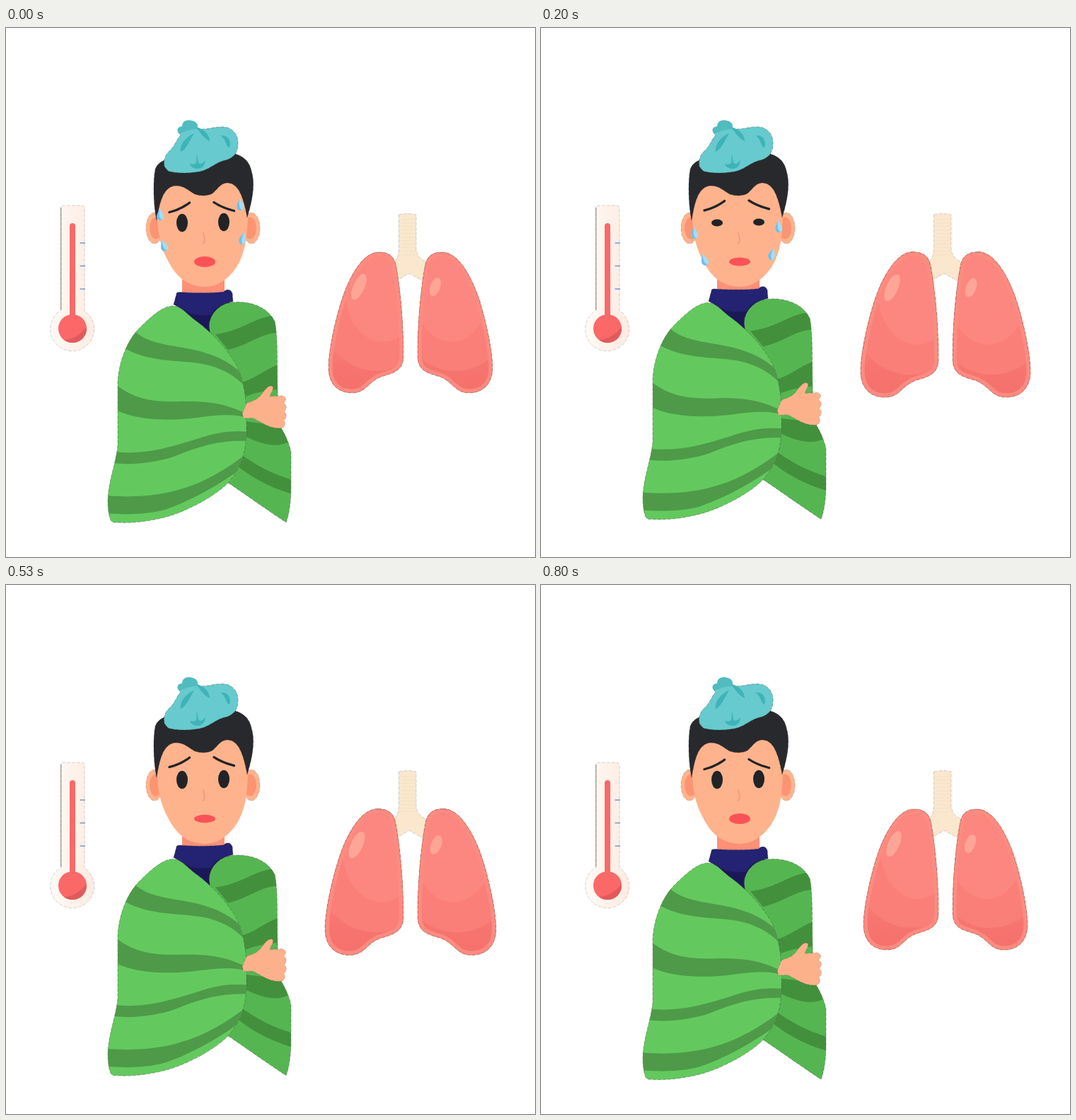
An HTML page that plays this animation: 748x748 px, repeating every 0.94 s.

```html
<!DOCTYPE html>
<html lang="en">
<head>
<meta charset="utf-8">
<title>Fever and lungs</title>
<style>
html, body { margin: 0; width: 100%; height: 100%; overflow: hidden; background: #fff; }
svg { display: block; width: 100vw; height: 100vh; }
.edge { stroke: #3a3433; stroke-width: .6; stroke-opacity: .6; stroke-dasharray: 5 2; }
.faint { stroke-opacity: .35; }
.line { fill: none; stroke-linecap: round; }
</style>
</head>
<body>
<svg viewBox="0 0 748 748" xmlns="http://www.w3.org/2000/svg">
  <defs>
    <linearGradient id="glass"><stop offset="0" stop-color="#fffaf6"/><stop offset="1" stop-color="#fdebe0"/></linearGradient>
    <linearGradient id="flesh" x1="0" y1="0" x2="0" y2="1"><stop offset=".5" stop-color="#f97d76"/><stop offset="1" stop-color="#f5706b"/></linearGradient>
    <path id="lobe" d="M528 317C508 316 490 343 478 375C467 405 456 455 456 480C456 504 470 516 489 516C511 516 512 498 534 492C552 487 562 482 562 463C562 420 558 370 551 334C548 322 540 317 528 317Z"/>
    <path id="front" d="M236 393C222 393 205 408 190 423C172 440 160 470 158 500L158 590C156 615 143 645 144 672C145 690 147 698 152 699C180 701 212 697 240 687C270 676 300 658 314 643C328 628 340 605 340 570C341 530 338 500 325 475C310 450 290 430 270 415C256 405 248 393 236 393Z"/>
    <path id="back" d="M288 428C284 410 298 391 318 388C345 385 370 394 380 415C385 440 383 480 384 510L385 560C392 568 402 590 403 600L403 650C403 670 400 690 396 699C370 682 335 657 314 643L300 560Z"/>
    <clipPath id="lobeClip"><use href="#lobe"/></clipPath>
    <clipPath id="lobeClipR"><use href="#lobe" transform="matrix(-1 0 0 1 1144 0)"/></clipPath>
    <clipPath id="frontClip"><use href="#front"/></clipPath>
    <clipPath id="backClip"><use href="#back"/></clipPath>
    <clipPath id="bulb"><circle cx="94" cy="425" r="20"/></clipPath>
    <g id="drop">
      <path fill="#a6dcf4" d="M0-9C2-3 5 0 5 4A5 5 0 0 1-5 4C-5 0-2-3 0-9Z"/>
      <path fill="#72bde6" d="M0-9C-2-3-5 0-5 4A5 5 0 0 0 2 8.500C-2 6-2 0 0-9Z"/>
    </g>
  </defs>

  <!-- thermometer -->
  <path class="edge faint" fill="url(#glass)" d="M78 399V255Q78 251 83 251H106Q111 251 111 255V400A31 31 0 1 1 78 399Z"/>
  <path class="line" stroke="#6d6260" stroke-width=".8" d="M77.700 254V398"/>
  <path class="line" stroke="#fb6868" stroke-width="8" d="M94 280V412"/>
  <circle cx="94" cy="425" r="20" fill="#fb6868"/>
  <path clip-path="url(#bulb)" fill="#e15a5b" d="M80 441C98 441 107 430 115 422V447H80Z"/>
  <path stroke="#6a9fd0" stroke-width="1.600" d="M104.500 304H112M104.500 336.500H112M104.500 369H112"/>

  <!-- windpipe and lungs -->
  <path class="edge faint" fill="#fae7ce" d="M555.500 264Q568 261 580 264V313C581 323 588 329 597 332L590 358L570 347L551 358L546 331C553 329 555 322 555.500 313Z"/>
  <path id="rings" stroke="#f6e0c4" stroke-width="1.200" fill="none"/>
  <g id="lungL">
    <use href="#lobe" fill="url(#flesh)"/>
    <g clip-path="url(#lobeClip)">
      <ellipse cx="525" cy="390" rx="85" ry="95" fill="#fa7f78"/>
      <ellipse cx="533" cy="370" rx="54" ry="74" fill="#fc8780"/>
      <use href="#lobe" fill="none" stroke="#fc8b80" stroke-width="11"/>
    </g>
    <use href="#lobe" class="edge" fill="none"/>
    <ellipse fill="#fea597" rx="8" ry="19.500" transform="translate(499 366) rotate(24)"/>
  </g>
  <g id="lungR">
    <use href="#lobe" fill="url(#flesh)" transform="matrix(-1 0 0 1 1144 0)"/>
    <g clip-path="url(#lobeClipR)">
      <ellipse cx="635" cy="390" rx="84" ry="95" fill="#fa7f78"/>
      <ellipse cx="630" cy="370" rx="54" ry="74" fill="#fc8780"/>
      <use href="#lobe" fill="none" stroke="#fc8b80" stroke-width="11" transform="matrix(-1 0 0 1 1144 0)"/>
    </g>
    <use href="#lobe" class="edge" fill="none" transform="matrix(-1 0 0 1 1144 0)"/>
    <ellipse fill="#fea597" rx="7" ry="13.500" transform="translate(607 366) rotate(20)"/>
  </g>

  <!-- neck and body -->
  <path fill="#fd9076" d="M249 335H309V385H249Z"/>
  <g id="body">
    <path fill="#1b1859" d="M240 388H318L290 434L262 425Z"/>
    <path class="edge" fill="#242273" d="M237 391L241 376Q241 373 246 373.500C268 375 292 375 308 373C312 368 318 370 320 375L321 387C302 390 294 397 290 405Q274 407 262 404Z"/>
    <use href="#back" class="edge" fill="#55b651"/>
    <g clip-path="url(#backClip)" fill="#43903c">
      <path d="M296 433C335 428 350 409 382 406L386 431C360 431 345 448 314 455Z"/>
      <path d="M330 502C350 498 368 481 388 475V511C365 512 348 517 334 523Z"/>
      <path d="M336 556L388 562L402 584C385 595 360 589 336 576Z"/>
      <path d="M330 601C355 620 380 632 408 640V660C375 651 345 635 324 616Z"/>
    </g>
    <use href="#front" class="edge" fill="#63c95e"/>
    <g clip-path="url(#frontClip)" fill="#4e9a48">
      <path d="M182 429C203 448 236 448 270 456C302 464 322 476 334 490L341 510C327 494 308 481 278 475C243 469 203 473 168 453Z"/>
      <path d="M155 504C185 528 215 529 250 528C290 527 318 533 342 547V552C325 545 300 547 270 551C230 556 185 555 155 540Z"/>
      <path d="M150 599C200 605 240 590 270 581C300 571 320 569 343 571V584C300 582 270 593 240 605C215 614 180 619 150 615Z"/>
      <path d="M140 661C200 666 240 657 275 642C305 628 325 614 342 600L334 622C300 647 262 668 225 681C195 689 165 688 140 686Z"/>
    </g>
    <path class="edge faint" fill="#fdb18b" d="M334 545L340.500 530C350 528 357 524 362 517C367 510 371 506 375 506C379 507 378 511 375.500 515L373 521L390 520C397 521 397 528 392 530C398 533 397 540 393 542C398 546 397 552 393 554C396 561 394 566 386 566C371 566 361 557 349 551.500L336 552Z"/>
  </g>

  <!-- head -->
  <g fill="#ffb38c">
    <ellipse class="edge faint" cx="210" cy="283" rx="12" ry="22"/>
    <ellipse class="edge faint" cx="347" cy="283" rx="12" ry="22"/>
  </g>
  <g fill="#fb9473">
    <ellipse cx="212" cy="283" rx="9" ry="15.500"/>
    <ellipse cx="345" cy="283" rx="9" ry="15.500"/>
  </g>
  <path fill="#ffb38c" d="M214 215V268C215 300 222 318 234 338C246 357 262 366 281 366C298 366 314 356 326 338C338 318 341 298 342 265V215Z"/>
  <path class="edge" fill="#28292d" d="M213 272C208 250 208 215 211 200C215 187 232 180 280 177C318 172 342 178 347 202C353 222 348 245 341 268C339 257 337 248 334 240C330 228 323 219 313 219C302 219 298 231 290 235Q279 239 267 235C258 230 252 223 241 223C232 223 226 229 222 237C217 248 215 260 213 272Z"/>

  <!-- ice bag -->
  <path class="edge" fill="#66cace" d="M224 196C222 186 226 178 232 173C239 167 241 157 248 150C257 142 266 140 277 143C288 143 296 139 309 140C321 141 329 152 328 164C328 176 322 184 310 187C297 190 290 198 278 202C264 206 238 206 229 202Z"/>
  <path fill="#50bcc0" d="M246 151C240 145 242 140 249 139C249 131 257 129 263 131C269 132 273 137 270 143C262 143 253 145 246 151Z"/>
  <g fill="#3fb3b7">
    <path d="M266 149C258 162 254 173 247 175C245 166 254 154 266 149Z"/>
    <path d="M269 140C280 143 288 151 288 160C281 157 274 148 269 140Z"/>
    <path d="M303 152C314 151 319 159 316 169C311 168 311 156 303 152Z"/>
    <path d="M270 178C272 184 270 190 274 192Q278 192 282 187C281 196 276 199 271 199C265 199 261 196 260 192Q266 194 269 191Z"/>
  </g>

  <!-- face -->
  <g fill="#222327">
    <ellipse id="eyeL" cx="249" cy="275.500" rx="8"/>
    <ellipse id="eyeR" cx="308" cy="274.500" rx="8"/>
  </g>
  <path id="brows" class="line" stroke="#222327" stroke-width="3.300" d="M231 260.500C241 258 252 253 259.500 247M294 246.500C302 252 313 256 322.500 258.500"/>
  <path class="line" stroke="#fb9473" stroke-width="1.600" d="M279 290C280 296 283 302 278.500 305"/>
  <ellipse id="mouth" cx="281" cy="330.500" rx="15" fill="#fb5355"/>
  <g id="drops"></g>
</svg>
<script>
const el = id => document.getElementById(id);
const LOOP = 940;
// one value per picture, 15 pictures a second
const BREATH = [0, .18, .37, .57, .76, .91, 1, .88, .68, .42, .17, .05, 0, 0];
const LID = [12.7, 10, 7.5, 5, 3, 1.3, 4, 9];
const FADE = [1, 1, 1, 1, .8, .55, .25, 0];
const DROP_AT = [0, 1, 3, 5];
const DROPS = [
  { pts: [[218, 263], [217, 272], [217, 289], [223, 311]], tilt: -4 },
  { pts: [[223, 307], [225, 313], [231, 327], [238, 344]], tilt: -18 },
  { pts: [[331, 249], [333, 259], [336, 280], [336, 298]], tilt: -4 },
  { pts: [[335, 297], [332, 305], [327, 319], [322, 334]], tilt: 14 }
];

let rings = "";
for (let y = 270; y < 322; y += 5) rings += `M556 ${y}Q568 ${y + 2} 579.500 ${y}`;
el("rings").setAttribute("d", rings);

for (const d of DROPS) {
  d.node = document.createElementNS("http://www.w3.org/2000/svg", "use");
  d.node.setAttribute("href", "#drop");
  el("drops").append(d.node);
}

// place on a drop's path; runs on past the last point
function along(pts, n) {
  let i = 0;
  while (i < DROP_AT.length - 2 && n >= DROP_AT[i + 1]) i++;
  const k = (n - DROP_AT[i]) / (DROP_AT[i + 1] - DROP_AT[i]);
  return pts[i].map((v, a) => v + (pts[i + 1][a] - v) * k);
}

function step(ms) {
  let n = 0;
  while (n < BREATH.length - 1 && Math.round((n + 1) * 20 / 3) * 10 <= ms) n++;
  return n;
}

function swell(id, x, k) {
  el(id).setAttribute("transform",
    `translate(${x} 328) scale(${1 + .068 * k} ${1 + .058 * k}) translate(${-x} -328)`);
}

function draw(ms) {
  const n = step(ms), k = BREATH[n];
  el("body").setAttribute("transform", `translate(0 ${-8 * k})`);
  el("brows").setAttribute("transform", `translate(0 ${-4.5 * k})`);
  el("mouth").setAttribute("ry", 7.5 - 2.6 * k);
  swell("lungL", 563, k);
  swell("lungR", 581, k);

  for (const id of ["eyeL", "eyeR"]) el(id).setAttribute("ry", LID[n] ?? LID[0]);
  for (const d of DROPS) {
    const [x, y] = along(d.pts, n);
    d.node.setAttribute("transform", `translate(${x} ${y}) rotate(${d.tilt})`);
    d.node.setAttribute("opacity", FADE[n] ?? 0);
  }
}

function tick() {
  draw(performance.now() % LOOP);
  requestAnimationFrame(tick);
}
tick();
</script>
</body>
</html>
```
